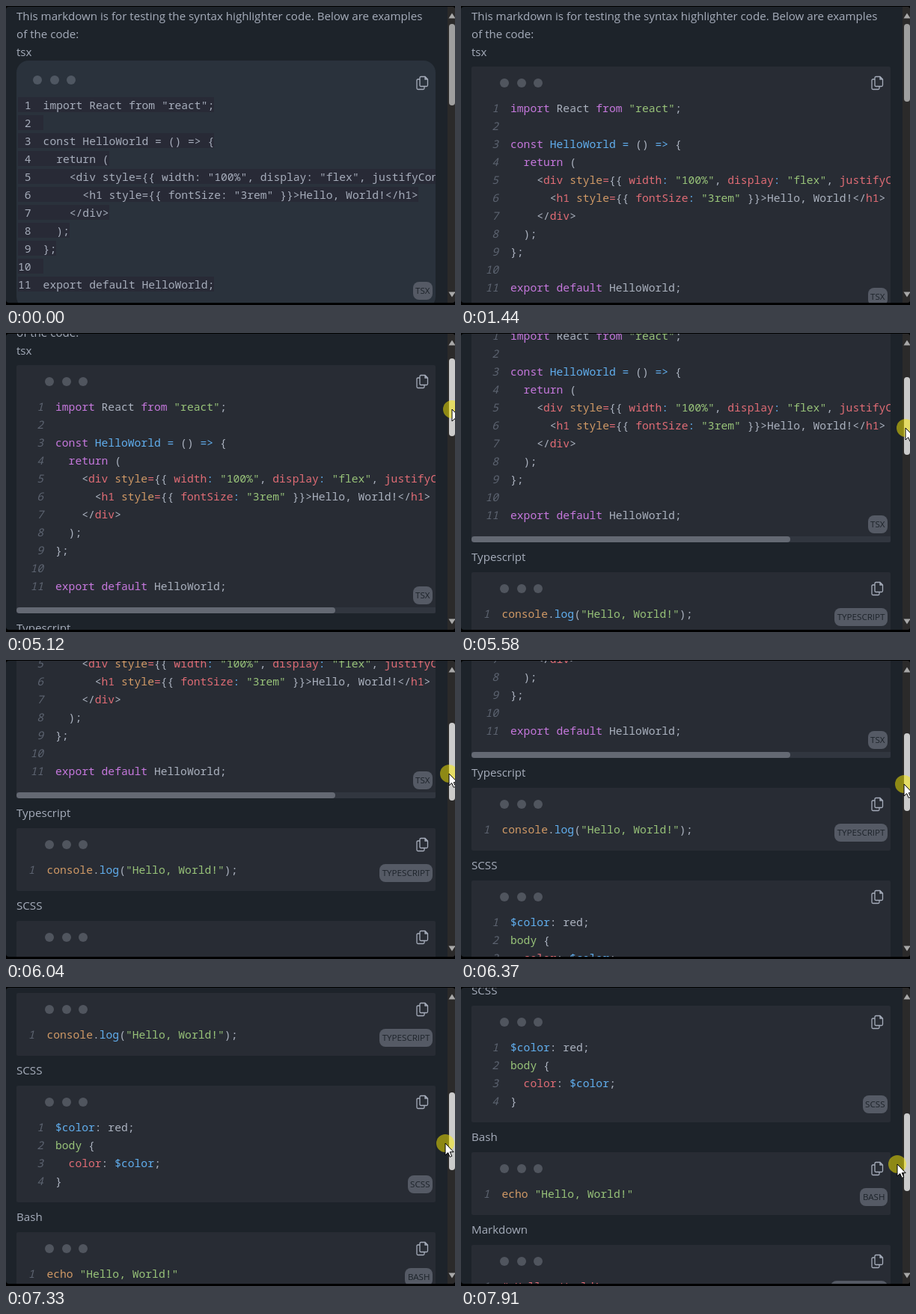
Write an HTML page that moves like this. It is 600 px wide and 400 px high and loops after 8 s.

```html
<!DOCTYPE html>
<html lang="en">
<head>
<meta charset="utf-8">
<title>Syntax highlighter test</title>
<style>
  html, body { margin: 0; width: 100%; height: 100%; overflow: hidden; background: #000; }
  #view {
    position: absolute; left: 0; top: 1px; width: 600px; height: 396px; overflow: hidden;
    background: #1d232a; border-radius: 4px;
    font: 15.13px/24px "Open Sans", "Noto Sans", sans-serif; color: #a6adbb;
  }
  #view div, #view svg { position: absolute; }
  #page { left: 0; top: -1px; width: 590px; height: 1100px; }
  .label { left: 14px; white-space: pre; }
  .block { left: 14px; width: 560px; overflow: hidden; background: #282c34; color: #abb2bf; border-radius: 2px; }
  .plain { background: #2a323c; color: #a6adbb; border-radius: 16px; }
  .line { left: 0; white-space: pre; font: 500 14.66px/24px "Noto Sans Mono", monospace; }
  .line b { font-weight: inherit; }
  .line i { display: inline-block; text-align: right; padding-right: 16px; color: #5c6370; }
  .plain .line i { display: inline; font-style: normal; color: inherit; }
  .plain .line span { background: #282a36; }
  .dot { width: 12px; height: 12px; border-radius: 50%; background: currentColor; opacity: .3; }
  .tag {
    right: 4px; bottom: 12px; height: 24px; padding: 0 3.5px; border-radius: 8px;
    background: #555a65; color: #1d232a; font-size: 11.6px;
  }
  .hbar { left: 0; bottom: 0; width: 560px; height: 8px; background: #31363f; }
  .hbar div { width: 426px; height: 8px; border-radius: 4px; background: #646973; }
  #track { left: 590px; top: 0; width: 10px; height: 396px; background: #2b2a2a; }
  #thumb { left: 592px; width: 8px; border-radius: 4px; }
  #badge { left: 503px; width: 36px; height: 31px; border-radius: 3px; background: #000; }
</style>
</head>
<body>
<div id="view">
  <div id="page"></div>
  <div id="track"></div>
  <svg width="600" height="396" fill="#a8a8a8"><path d="M591.5 15.5l4.5-7 4.5 7z"/><path d="M591.5 381.5l4.5 7 4.5-7z"/></svg>
  <div id="thumb"></div>
  <div id="badge">
    <svg width="36" height="31"><circle id="ring" cx="18" cy="15.5" r="7" pathLength="100" fill="none" stroke="#fff" stroke-width="1.2"/></svg>
  </div>
  <svg id="cursor" width="40" height="40" style="left:-16px;top:-17px">
    <circle cx="16" cy="16" r="12" fill="#fff000" fill-opacity=".5"/>
    <path d="M16 16v16l3.7-3.4 2.5 5.8 2.6-1.1-2.5-5.6h4.9z" fill="#fff" stroke="#000"/>
  </svg>
</div>
<script>
const $ = id => document.getElementById(id);
const page = $('page');
const colors = { p: '#c678dd', b: '#61afef', g: '#98c379', r: '#e06c75', o: '#d19a66', w: '#abb2bf' };

// "~x" switches to colour x for the text that follows
const tsx = `~pimport~w React ~pfrom~w ~g"react"~w;

~pconst~w ~bHelloWorld =~w () ~b=>~w {
  ~preturn~w (
    <~rdiv~w ~ostyle~r=~w{{ ~rwidth~b:~w ~g"100%"~w, ~rdisplay~b:~w ~g"flex"~w, ~rjustifyContent~b:~w ~g"center"~w }}>
      <~rh1~w ~ostyle~r=~w{{ ~rfontSize~b:~w ~g"3rem"~w }}>Hello, World!</~rh1~w>
    </~rdiv~w>
  );
};

~pexport default~w HelloWorld;`;

const copyIcon = `<svg width="20" height="22" style="left:531.5px;top:TOPpx" fill="none" stroke="#a6adbb" stroke-width="1.3">
  <path d="M7 14V4q0-1.5 1.5-1.5H14L17.5 6v8q0 1.5-1.5 1.5H8.5Q7 15.5 7 14zM14 2.5V6h3.5M7 6H4.5Q3 6 3 7.5V18q0 1.5 1.5 1.5h7q1.5 0 1.5-1.5v-2.5"/></svg>`;

function add(parent, className, style, html = '') {
  const el = document.createElement('div');
  el.className = className;
  el.style.cssText = style;
  el.innerHTML = html;
  parent.append(el);
  return el;
}

const escape = s => s.replace(/&/g, '&amp;').replace(/</g, '&lt;');

function paint(line) {
  const [first, ...rest] = line.split('~');
  return escape(first) + rest.map(s => `<b style="color:${colors[s[0]]}">${escape(s.slice(1))}</b>`).join('');
}

function label(center, text) {
  add(page, 'label', `top:${center - 13}px`, text);
}

function block(top, lang, code, { plain = false, scrolls = false } = {}) {
  const lines = code.split('\n');
  const height = 60 + 24 * lines.length + (plain || scrolls ? 8 : 0);
  const el = add(page, plain ? 'block plain' : 'block', `top:${top}px;height:${height}px`);
  const dotX = plain ? 22 : 38, dotY = plain ? 20 : 16;
  for (const dx of [0, 22.5, 45]) add(el, 'dot', `left:${dotX + dx}px;top:${dotY}px`);
  el.insertAdjacentHTML('beforeend', copyIcon.replace('TOP', plain ? 19 : 11));
  const numberWidth = lines.length > 1 ? 36 : 24.4;
  lines.forEach((line, i) => {
    const number = plain ? `<i>${String(i + 1).padStart(2)}</i>` : `<i style="width:${numberWidth}px">${i + 1}</i>`;
    const text = plain ? escape(line.replace(/~./g, '')) : paint(line);
    add(el, 'line', `top:${(plain ? 47 : 43) + 24 * i}px;left:${plain ? 2 : 0}px`, `<span>${number}${text}</span>`);
  });
  add(el, 'tag', '', lang);
  if (scrolls) add(el, 'hbar', '', '<div></div>');
  return el;
}

label(14, 'This markdown is for testing the syntax highlighter code. Below are examples');
label(38, 'of the code:');
label(62, 'tsx');
const plainBlock = block(73, 'TSX', tsx, { plain: true });
const richBlock = block(81, 'TSX', tsx, { scrolls: true });
label(433, 'Typescript');
block(453, 'TYPESCRIPT', '~oconsole~w.~blog~w(~g"Hello, World!"~w);');
label(557, 'SCSS');
block(577, 'SCSS', '~b$color~w: red;\n~gbody~w {\n  ~rcolor~w: ~b$color~w;\n}');
label(753, 'Bash');
block(773, 'BASH', '~oecho~w ~g"Hello, World!"');
label(877, 'Markdown');
block(897, 'MARKDOWN', '~r# Hello, World!');

const clamp = x => Math.min(1, Math.max(0, x));

// Linear interpolation through [time, value] pairs
function track(keys, t) {
  if (t <= keys[0][0]) return keys[0][1];
  for (let i = 1; i < keys.length; i++) {
    const [t0, a] = keys[i - 1], [t1, b] = keys[i];
    if (t < t1) return a + (b - a) * (t - t0) / (t1 - t0);
  }
  return keys[keys.length - 1][1];
}

const drag = [[4920, 0], [5120, 10], [6040, 60], [6760, 90], [7370, 119], [7440, 120], [7910, 145]];
const cursorX = [[4600, 616], [4760, 609], [4940, 602], [5120, 596], [6040, 592], [6760, 591], [7910, 583]];
const builds = [[320, 1440], [2470, 3590]];

function render(t) {
  const plain = t < 160 || (t >= 1640 && t < 4200);
  plainBlock.style.display = plain ? '' : 'none';
  richBlock.style.display = plain ? 'none' : '';

  const offset = Math.round(track(drag, t));
  page.style.transform = `translateY(${-Math.round(offset * 3.805)}px)`;
  const thumb = $('thumb').style;
  thumb.top = 23 + offset + 'px';
  thumb.height = (plain ? 109 : 104) + 'px';
  thumb.background = t < 4600 ? '#9f9f9f' : '#cbcbcb';
  $('cursor').style.transform = `translate(${Math.round(track(cursorX, t))}px, ${92 + offset}px)`;

  const build = builds.find(([from, to]) => t >= from && t < to);
  const badge = $('badge').style;
  badge.display = build ? '' : 'none';
  if (build) {
    const shown = Math.min(clamp((t - build[0]) / 100), clamp((build[1] - t) / 150));
    const p = clamp((t - build[0]) % 1000 / 800);
    badge.opacity = shown;
    badge.top = 345 - 10 * shown + 'px';
    $('ring').style.strokeDasharray = `${100 * p * p * (3 - 2 * p)} 100`;
  }
}

function tick() {
  render(performance.now() % 8000);
  requestAnimationFrame(tick);
}
tick();
</script>
</body>
</html>
```
